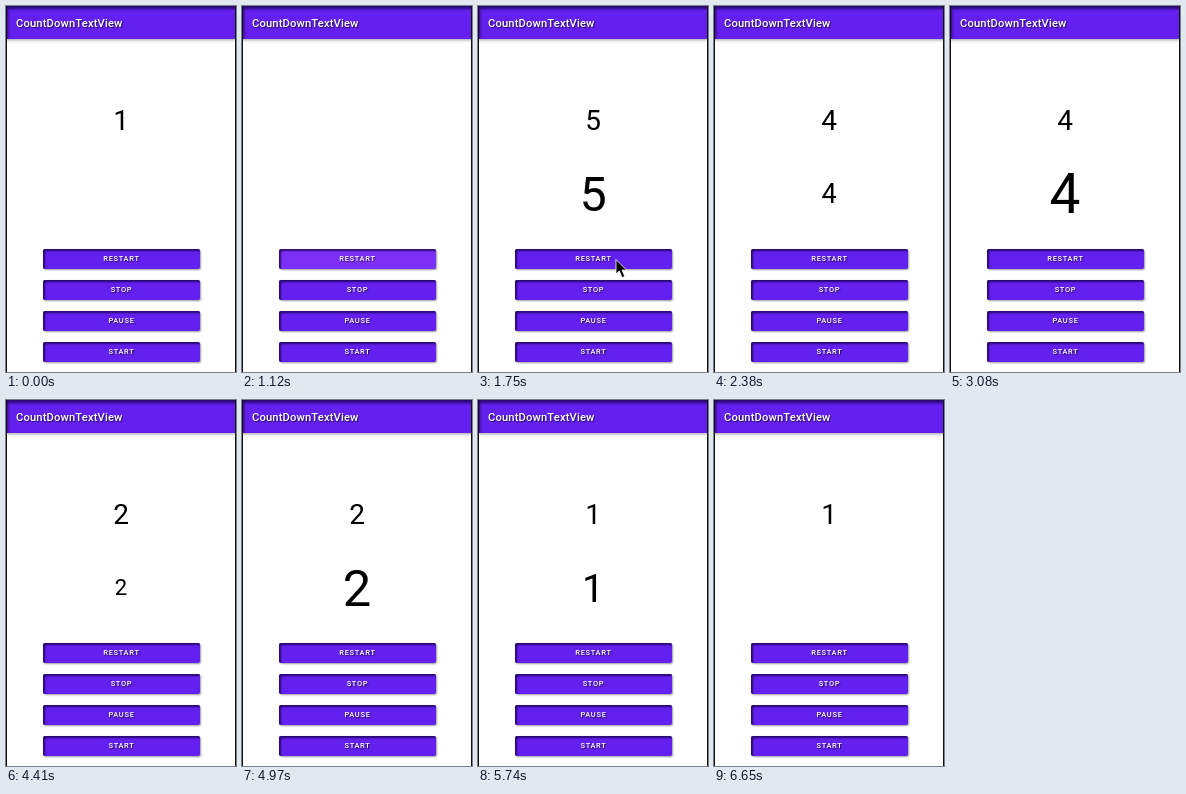
An HTML page for the animation above (6.93 s loop, 230 by 366 pixels).

```html
<!DOCTYPE html>
<html lang="en">
<head>
<meta charset="utf-8">
<title>CountDownTextView</title>
<style>
  html, body { margin: 0; width: 100%; height: 100%; overflow: hidden; background: #fff; }
  body { position: relative; font-family: Roboto, sans-serif; }
  #stage { position: absolute; left: 0; top: 0; width: 230px; height: 366px; overflow: hidden; }
  #stage::after { content: ""; position: absolute; inset: 0; border: solid #111; border-width: 0 1px; }
  header, .button {
    position: absolute; box-sizing: border-box; background: #6420ee; color: #fff;
    font-weight: 500; white-space: nowrap; text-shadow: 1px 1px 1px rgba(0, 0, 0, .6);
  }
  header {
    left: 0; top: 0; width: 230px; height: 33px; padding-left: 10px;
    font-size: 11.2px; line-height: 36px; letter-spacing: .0125em;
    box-shadow: inset 2px 3px 3px rgba(20, 0, 70, .75), 0 1px 3px rgba(0, 0, 0, .4);
  }
  .button {
    left: 37px; width: 157px; height: 20px; border-radius: 2px; text-align: center;
    font-size: 7.5px; line-height: 20.5px; letter-spacing: .09em;
    box-shadow: inset 2px 2px 2px rgba(20, 0, 70, .75), 1px 1px 2px rgba(0, 0, 0, .4);
  }
  svg { position: absolute; left: 0; top: 0; }
</style>
</head>
<body>
<div id="stage">
  <header>CountDownTextView</header>
  <svg width="230" height="366" text-anchor="middle">
    <text id="small" x="115" y="124" font-size="28"></text>
    <text id="big" x="115"></text>
  </svg>
</div>
<script>
  const LOOP = 6930, PRESS = 840, CLEAR = 910, FIRST = 1190, TICK = 1050, GROW = 1000;
  const END = FIRST + 5 * TICK, FADE = 210;
  const stage = document.getElementById('stage');
  const small = document.getElementById('small');
  const big = document.getElementById('big');
  const clamp = v => Math.max(0, Math.min(1, v));

  const [restart] = ['RESTART', 'STOP', 'PAUSE', 'START'].map((label, i) => {
    const button = document.createElement('div');
    button.className = 'button';
    button.textContent = label;
    button.style.top = 243 + 31 * i + 'px';
    stage.append(button);
    return button;
  });

  stage.insertAdjacentHTML('beforeend', `<svg id="cursor" width="230" height="366">
    <path d="M138 253.5V268l3.3-3 2.8 6.6 2.7-1.2-2.8-6.3h4.6z" fill="#000" stroke="#fff" stroke-width=".8"/>
  </svg>`);
  const cursor = document.getElementById('cursor');

  function render(t) {
    const counting = t >= FIRST && t < END + FADE;
    const index = Math.min(4, Math.floor((t - FIRST) / TICK));
    small.textContent = t < CLEAR ? 1 : t < FIRST ? '' : 5 - index;

    // Each digit grows with a decelerating curve.
    const progress = clamp((t - FIRST - index * TICK) / GROW);
    const size = 56 * (1 - .7 * (1 - progress) ** 2);
    big.textContent = counting ? 5 - index : '';
    big.setAttribute('font-size', size);
    big.setAttribute('y', 187.6 + .3555 * size);
    big.setAttribute('opacity', 1 - clamp((t - END) / FADE));

    // Press highlight on the restart button.
    const glow = clamp((t - PRESS + 70) / 200) * clamp((1470 - t) / 300);
    restart.style.backgroundColor = `rgb(${100 + 24 * glow}, ${32 + 16 * glow}, ${238 + 8 * glow})`;
    cursor.style.display = t >= 1400 && t < 2030 ? '' : 'none';
  }

  const start = performance.now();
  function frame() {
    render((performance.now() - start) % LOOP);
    requestAnimationFrame(frame);
  }
  frame();
</script>
</body>
</html>
```
